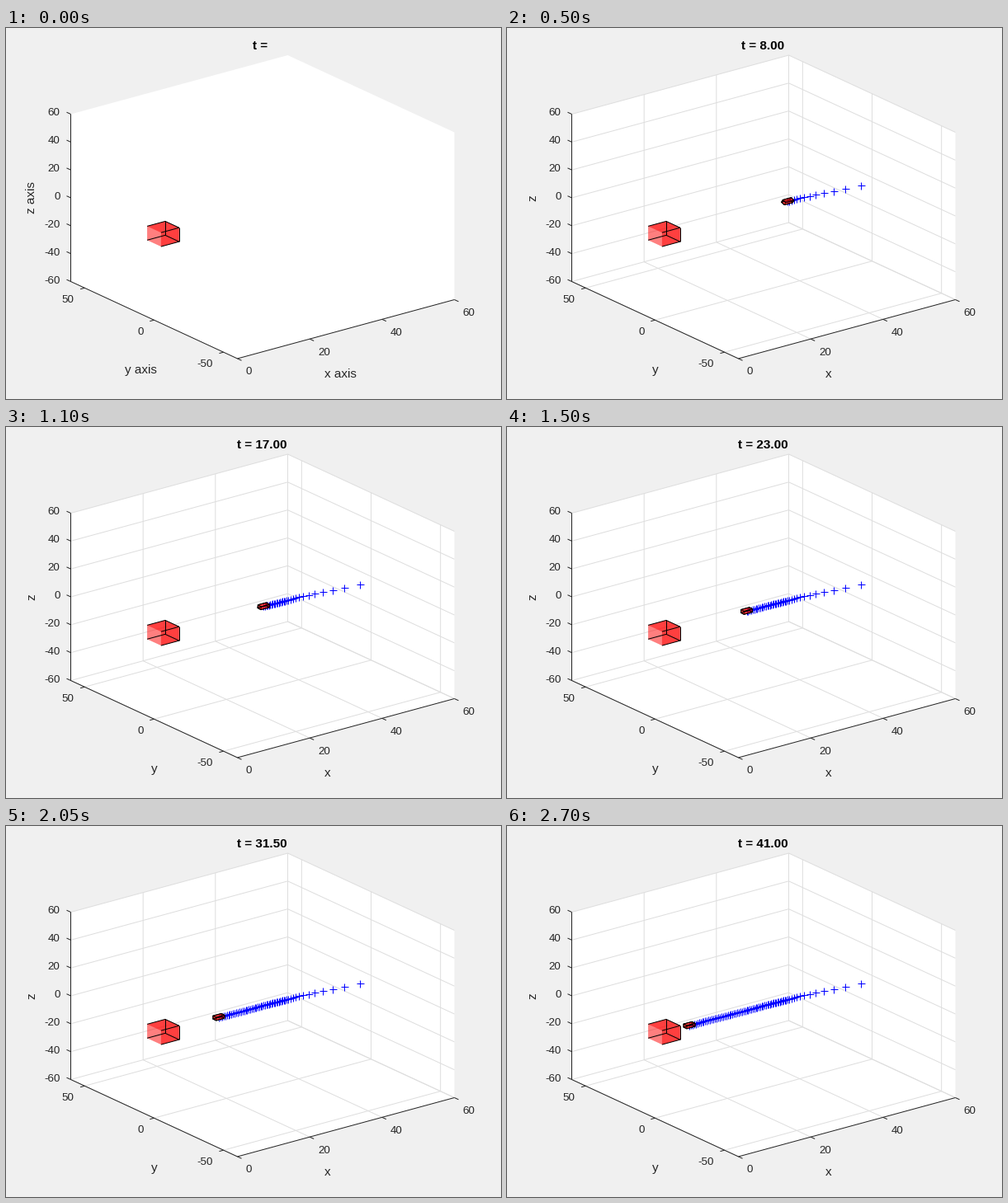
Animation of 600x450 px, one loop 2750 ms. Source, as a matplotlib script:

```python
import numpy as np
import matplotlib.pyplot as plt
from matplotlib.animation import FuncAnimation
from matplotlib.collections import LineCollection, PolyCollection

W, H, DPI = 600, 450, 100
PX = 72 / DPI                      # one pixel in points
FRAMES, STEP_MS = 55, 50
DARK = "#262626"
FIRST_VISIBLE = 4                  # earlier steps lie beyond x = 60

plt.rcParams["font.family"] = "Liberation Sans"
fig = plt.figure(figsize=(W / DPI, H / DPI), dpi=DPI, facecolor="#f0f0f0")
ax = fig.add_axes([0, 0, 1, 1])
ax.set_xlim(0, W)
ax.set_ylim(H, 0)
ax.axis("off")

ORIGIN = np.array([280.5, 401.0])  # corner x = 0, y = -60, z = -60
BASIS = np.array([[263 / 60, -71.5 / 60],
                  [-202 / 120, -93.5 / 120],
                  [0, -203 / 120]])


def project(points):
    return ORIGIN + (np.asarray(points, float) + [0, 60, 60]) @ BASIS


def label(x, y, text, size, **kw):
    kw = {"color": DARK, "ha": "center", "va": "baseline", **kw}
    return ax.text(x, y, text, fontsize=size * PX, **kw)


def add_lines(segments, color, z):
    lines = LineCollection(segments, colors=color, linewidths=PX, zorder=z)
    ax.add_collection(lines)
    return lines


def box_corners(half, roll=0.0):
    """Corners indexed [x, y, z], turned about the x axis."""
    s = np.array([-half, half])
    x, y, z = np.meshgrid(s, s, s, indexing="ij")
    c, n = np.cos(roll), np.sin(roll)
    return np.stack([x, c * y - n * z, n * y + c * z], axis=-1)


def box_faces(c):
    """Quads ordered x min, x max, y min, y max, z min, z max."""
    faces = []
    for axis in range(3):
        for side in (0, 1):
            q = np.take(c, side, axis=axis)
            faces.append(project([q[0, 0], q[0, 1], q[1, 1], q[1, 0]]))
    return faces


# Room
shell = [(0, -60, -60), (60, -60, -60), (60, -60, 60),
         (60, 60, 60), (0, 60, 60), (0, 60, -60)]
ax.add_patch(plt.Polygon(project(shell), fc="white", ec="none", zorder=0))

x_ticks = [0, 20, 40, 60]
y_ticks = [-50, 0, 50]
z_ticks = range(-60, 61, 20)
paths = [[(x, -60, -60), (x, 60, -60), (x, 60, 60)] for x in x_ticks]
paths += [[(0, y, -60), (60, y, -60), (60, y, 60)] for y in y_ticks]
paths += [[(0, 60, z), (60, 60, z), (60, -60, z)] for z in z_ticks]
grid = add_lines([project(p) for p in paths], "#dedede", 1)

# Axis lines, ticks and numbers
rulers = [project([(0, 60, 60), (0, 60, -60), (0, -60, -60), (60, -60, -60)])]
for x in x_ticks:
    p = project((x, -60, -60))
    rulers.append([p, p + [5, 2.3]])
    label(p[0] + 10, p[1] + 19.5, str(x), 13.4, ha="left")
for y in y_ticks:
    p = project((0, y, -60))
    rulers.append([p, p + [-5.2, 1.4]])
    label(p[0] - 13, p[1] + 18, str(y), 13.4, ha="right")
for z in z_ticks:
    p = project((0, 60, z))
    rulers.append([p, p + [-5, -2.3]])
    label(65.5, p[1] + 2, str(z), 13.4, ha="right")
add_lines(rulers, DARK, 2)

title = label(310, 25.5, "", 15.3, color="black", weight="bold")
x_name = label(390, 424, "", 15.2)
y_name = label(180, 419, "", 15.2)
z_name = label(35, 206, "", 15.2, rotation=90, rotation_mode="anchor")

# Large box, cut open where it leaves the room at x = 0
target = box_corners(5)
target[..., 0] = target[..., 0].clip(0)
ax.add_collection(PolyCollection(box_faces(target)[1:], zorder=4,
                                 facecolors=(1, 0, 0, 0.5), edgecolors="none"))
edges = [project(target[:, j, k]) for j in (0, 1) for k in (0, 1)]
edges += [project(target[1, j, :]) for j in (0, 1)]
edges += [project(target[1, :, k]) for k in (0, 1)]
add_lines(edges, "black", 5)

# Small box and its trail
chaser = PolyCollection([], facecolors=(1, 0, 0, 0.5), edgecolors="black",
                        linewidths=PX, zorder=7)
ax.add_collection(chaser)
trail, = ax.plot([], [], "+", color="blue", ms=9 * PX, mew=PX, zorder=6)


def position(k):
    """Damped approach that settles into a steady drift along x."""
    s = np.asarray(k, float) - FIRST_VISIBLE
    x = 44.07 - 0.4436 * s + 12.78 * (1 - s / 5.85) * np.exp(-0.156 * s)
    z = -2.8 * np.exp(-0.4 * s) - 0.9 * np.exp(-0.03 * s)
    return np.stack([x, 0 * s, z], axis=-1)


def update(n):
    k = (3 * n + 3) // 2
    started = n > 0
    grid.set_visible(started)
    title.set_text(f"t = {k / 2:.2f}" if started else "t =")
    title.set_x(310 if started else 308.5)
    for text, name, x in ((x_name, "x", 405), (y_name, "y", 163), (z_name, "z", 35)):
        text.set_text(name if started else name + " axis")
    x_name.set_x(390 if started else 405.5)
    y_name.set_x(180 if started else 163.5)

    steps = np.arange(FIRST_VISIBLE, k + 1)
    trail.set_data(*project(position(steps)).T)
    visible = k >= FIRST_VISIBLE
    chaser.set_visible(visible)
    if visible:
        roll = 0.75 * np.exp(-0.08 * (k - 9))
        chaser.set_verts(box_faces(box_corners(1.15, roll) + position(k)))
    return grid, title, x_name, y_name, z_name, trail, chaser


anim = FuncAnimation(fig, update, frames=FRAMES, interval=STEP_MS,
                     repeat=True, repeat_delay=0, blit=False)
plt.show()
```
